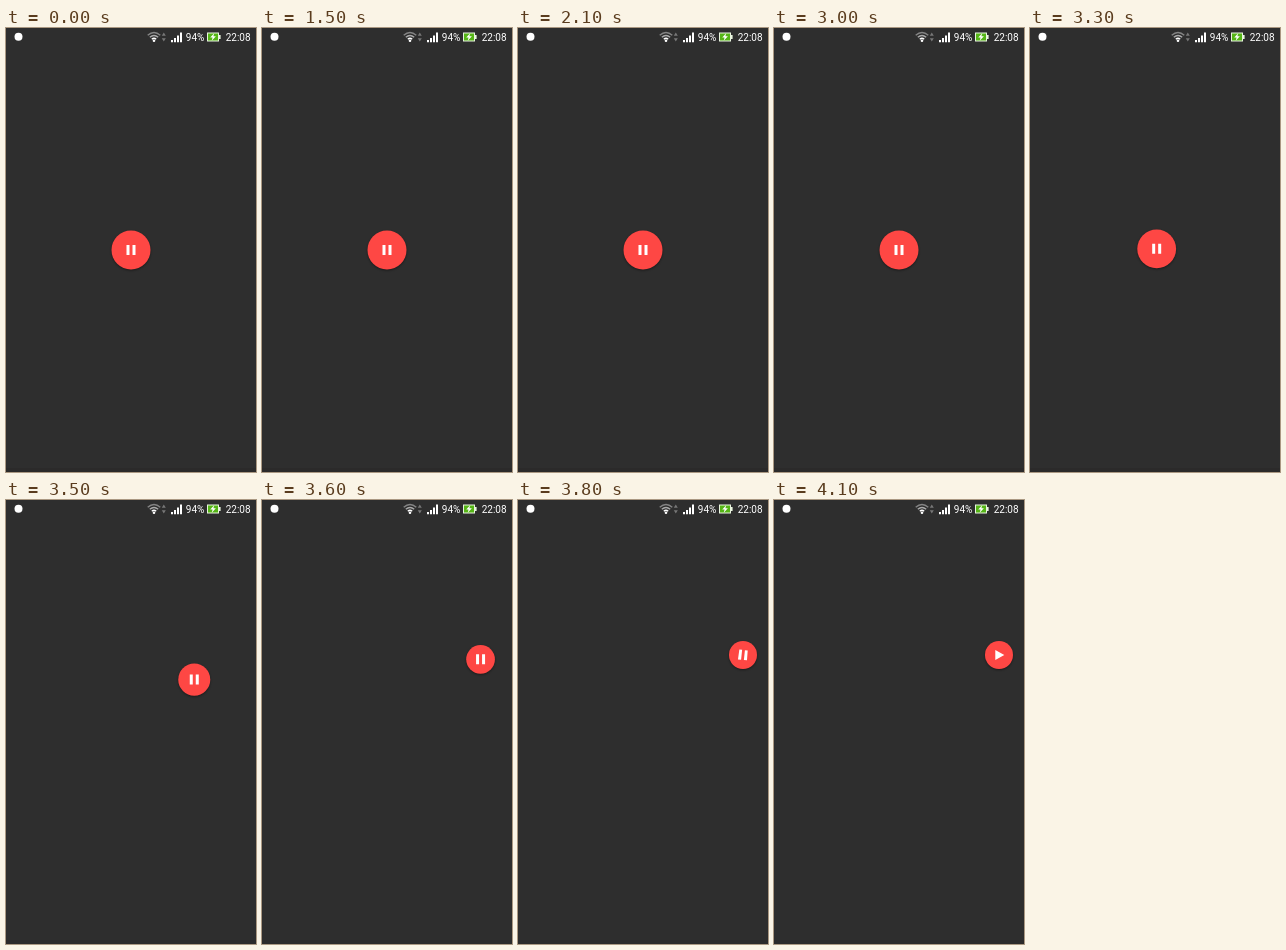
An HTML page that plays this animation: 250x444 px, repeating every 4.2 s.

```html
<!DOCTYPE html>
<html lang="en">
<head>
<meta charset="utf-8">
<title>Floating player button</title>
<style>
  html, body { margin: 0; height: 100%; overflow: hidden; background: #2e2e2e; }
  svg { display: block; width: 100vw; height: 100vh; }
  text { font: 10px Roboto, sans-serif; fill: #fff; }
  #disc { filter: drop-shadow(0 1.5px 1.3px rgba(0, 0, 0, .42)); }
</style>
</head>
<body>
<svg viewBox="0 0 250 444">
  <rect width="250" height="444" fill="#2e2e2e"/>
  <rect y="440" width="250" height="4" fill="#2b2a2a"/>

  <!-- status bar -->
  <circle cx="12.5" cy="8.7" r="4" fill="#fff"/>
  <g fill="none" stroke-width="1.4">
    <path d="M141.7 7.2Q148 1.6 154.3 7.2" stroke="#858585"/>
    <path d="M143.8 9.3Q148 5.6 152.2 9.3" stroke="#aaa"/>
    <path d="M145.8 11.2Q148 9.2 150.2 11.2" stroke="#fff"/>
  </g>
  <circle cx="148" cy="12.8" r="1.3" fill="#fff"/>
  <path d="M155.8 7.8l2-3.2 2 3.2zM155.8 10.2l2 3.2 2-3.2z" fill="#777"/>
  <path d="M165 12h2v2.2h-2zM168 10h2v4.2h-2zM171 7.5h2v6.7h-2zM174 4.6h2v9.6h-2z" fill="#fff"/>
  <text x="179.8" y="12.7">94%</text>
  <path d="M201 4.5h12v2.4h1.6v4H213v2.6h-12z" fill="#e9f5df"/>
  <path d="M202 5.5h10v7h-10z" fill="#55b516"/>
  <path d="M208.2 5.3l-4 4.3h2.4l-.9 3.2 4.2-4.5h-2.5z" fill="#fff"/>
  <text x="219.7" y="12.7">22:08</text>

  <g id="button">
    <circle id="disc" fill="#fe4744"/>
    <path id="icon" fill="#fff"/>
  </g>
</svg>
<script>
const LOOP = 4200, STEP = 100;
const [button, disc, icon] = ['button', 'disc', 'icon'].map(id => document.getElementById(id));

const lerp = (a, b, p) => a + (b - a) * p;
const ease = (t, start, length) => {
  const p = Math.min(1, Math.max(0, (t - start) / length));
  return (1 - Math.cos(Math.PI * p)) / 2;
};

// Two bars that close into a triangle while turning a quarter.
function iconPath(p) {
  const gap = lerp(1.5, 0, p), foot = lerp(4.5, 5, p), top = lerp(4.5, 0, p);
  const up = lerp(-5, -5.3, p), down = lerp(5, 3.7, p);
  const bar = s => `M${s * gap} ${down}L${s * gap} ${up}L${s * top} ${up}L${s * foot} ${down}Z`;
  return bar(-1) + bar(1);
}

function draw(t) {
  const move = ease(t, 3267, 398), morph = ease(t, 3750, 300);
  button.setAttribute('transform', `translate(${lerp(125, 225, move)} ${lerp(222, 155, move)})`);
  disc.setAttribute('r', lerp(19.5, 14, move));
  icon.setAttribute('d', iconPath(morph));
  icon.setAttribute('transform', `rotate(${90 * morph})`);
}

function tick() {
  draw(Math.floor(performance.now() % LOOP / STEP) * STEP);
  requestAnimationFrame(tick);
}
tick();
</script>
</body>
</html>
```
